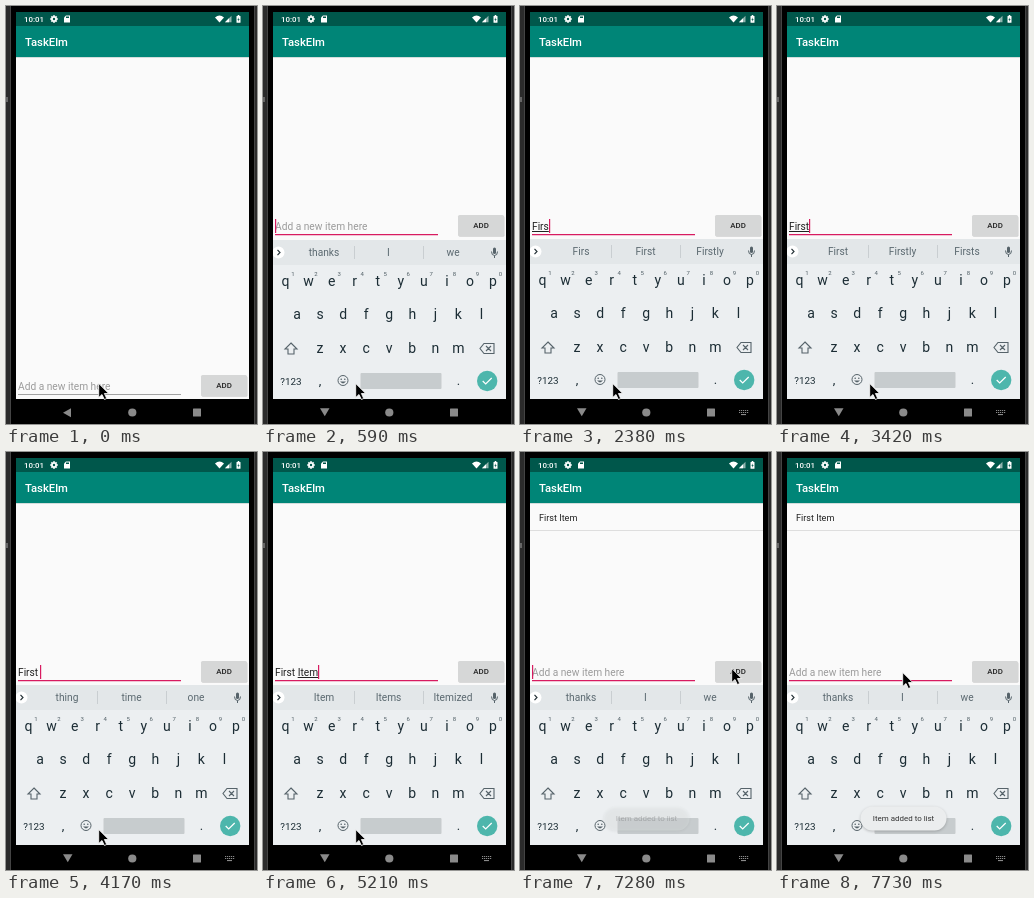
An HTML page with a canvas that plays this animation: 251 px wide and 418 px high, repeating every 8000 ms.

```html
<!DOCTYPE html>
<html lang="en">
<head>
<meta charset="utf-8">
<title>Task list app</title>
<style>
html, body { margin: 0; width: 100%; height: 100%; overflow: hidden; background: #000; }
canvas { display: block; }
</style>
</head>
<body>
<canvas id="stage" width="251" height="418"></canvas>
<script>
const c = document.getElementById('stage').getContext('2d');
const LOOP = 8000;
const ACCENT = '#d81b60', INK = '#1c2d35', ICON = '#56636a';

// time, typed text, start of the underlined word, suggestions
const TYPING = [
  [0, '', 0, 'thanks,I,we'],
  [1190, 'F', 0, 'thanks,I,we'],
  [1340, 'F', 0, 'F,For,From'],
  [1640, 'Fi', 0, 'Fi,First,Fine'],
  [2090, 'Fir', 0, 'Fi,First,Fine'],
  [2240, 'Fir', 0, 'Fir,First,Fire'],
  [2380, 'Firs', 0, 'Firs,First,Firstly'],
  [2530, 'First', 0, 'First,Firstly,Firsts'],
  [4020, 'First ', 6, 'First,Firstly,Firsts'],
  [4170, 'First ', 6, 'thing,time,one'],
  [4610, 'First I', 6, 'I,In,It'],
  [4760, 'First It', 6, 'It,Its,Item'],
  [4910, 'First Ite', 6, 'It,Its,Item'],
  [5060, 'First Ite', 6, 'Ite,Item,Items'],
  [5210, 'First Item', 6, 'Item,Items,Itemized'],
  [7130, '', 0, 'thanks,I,we']
];
const MOUSE = [[0, 93, 378], [6540, 162, 252], [6690, 199, 226], [6840, 212, 217], [7730, 126, 221]];
const CARET = [[0, 0], [290, 1], [2980, 0], [3420, 1], [5650, 0], [6250, 1], [7730, 0]];
const SLIDE = [[0, 160], [440, 70], [590, 1], [740, 0]];
const PRESS = [[0, '#d6d7d7'], [6990, '#b8b9b9'], [7130, '#c5c6c6'], [7280, '#d6d7d7']];
const TOAST = [[0, 0], [7280, .25], [7430, .6], [7580, .85], [7730, 1]];

const at = (steps, t) => steps.filter(s => s[0] <= t).pop();

function rect(x, y, w, h, fill, r = 0) {
  c.fillStyle = fill;
  c.beginPath();
  c.roundRect(x, y, w, h, r);
  c.fill();
}

function disc(x, y, r, fill) {
  c.fillStyle = fill;
  c.beginPath();
  c.arc(x, y, r, 0, 7);
  c.fill();
}

function text(s, x, y, size, fill, align = 'left', weight = 400) {
  c.font = `${weight} ${size}px Roboto, sans-serif`;
  c.textAlign = align;
  c.fillStyle = fill;
  c.fillText(s, x, y);
}

function shape(d, x, y, fill, stroke, width = 1) {
  const p = new Path2D(d);
  c.save();
  c.translate(x, y);
  if (fill) { c.fillStyle = fill; c.fill(p); }
  if (stroke) { c.strokeStyle = stroke; c.lineWidth = width; c.stroke(p); }
  c.restore();
}

function phone() {
  rect(0, 0, 251, 418, '#2b2b2b');
  rect(0, 91, 2, 5, '#666');
  rect(4, 0, 245, 418, '#000');
  rect(4, 0, 1, 418, '#444');
  rect(248, 0, 1, 418, '#444');
  rect(10, 6, 233, 387, '#fafafa');
}

function header() {
  rect(10, 51, 233, 1, '#d3dddc');
  rect(10, 20, 233, 31, '#008577');
  rect(10, 6, 233, 14, '#00574b');
  text('10:01', 18, 16, 7.9, '#fff', 'left', 500);
  for (let i = 0; i < 4; i++) {
    c.save();
    c.translate(48, 13);
    c.rotate(i * Math.PI / 4);
    rect(-.9, -3.7, 1.8, 7.4, '#fff');
    c.restore();
  }
  disc(48, 13, 2.6, '#fff');
  disc(48, 13, 1.2, '#00574b');
  shape('M2 0H6V7H0V2Z', 58, 9.5, '#fff');
  rect(60, 10.5, 3, 1.5, '#00574b');
  shape('M0 2Q4.5 -2 9 2L4.5 7Z', 209, 9.5, '#fff');
  shape('M6.5 0V6.5H0Z', 219, 9.8, '#8fb3ae');
  shape('M4 2.5V6.5H0Z', 219, 9.8, '#fff');
  rect(230.5, 10, 4, 6.8, '#fff', .5);
  rect(231.7, 9, 1.6, 1.5, '#fff');
  shape('M1.3 0L0 2.5H1L.8 4.5L2.2 1.8H1.1Z', 231.4, 11.2, '#00574b');
  text('TaskElm', 19, 40, 11.3, '#fff', 'left', 500);
}

function list() {
  text('First Item', 19, 68.5, 9.07, '#222');
  rect(10, 78, 233, 1, '#dedede');
}

function inputRow(t, typed, mark) {
  const y = t < 440 ? 160 : 0, focus = t >= 290;
  const size = 10.2, base = 224 + y;
  if (typed) text(typed, 12, base, size, '#212121');
  else text('Add a new item here', 12, base, size, '#9b9b9b');
  c.font = `400 ${size}px Roboto, sans-serif`;
  const end = 12 + c.measureText(typed).width;
  const from = 12 + c.measureText(typed.slice(0, mark)).width;
  if (end > from) rect(from, base + 1, end - from, 1, '#212121');
  rect(12, 228 + y, 163, focus ? 1.2 : .8, focus ? ACCENT : '#858585');
  if (at(CARET, t)[1]) rect(Math.round(end - .3), 213 + y, 1.2, 14, ACCENT);
  rect(195.5, 210.3 + y, 46, 20.5, '#d0d0d0', 1.5);
  rect(195, 209 + y, 46, 21, at(PRESS, t)[1], 1.5);
  text('ADD', 218, 222.2 + y, 7.9, '#222', 'center', 500);
}

function strip(words) {
  rect(10, 233, 233, 25, '#e3e7e9');
  disc(15.5, 245.5, 6, '#fff');
  shape('M0 0L2.5 2.7L0 5.4', 14.5, 242.8, null, '#263238', 1.2);
  words.split(',').forEach((w, i) => text(w, 61 + i * 64.5, 249, 10.2, '#5b6970', 'center'));
  rect(91, 239, 1, 13, '#c9ced1');
  rect(160, 239, 1, 13, '#c9ced1');
  rect(230, 240.5, 3, 6.5, ICON, 1.5);
  shape('M0 0Q0 4 3 4T6 0M3 4V6.5', 228.5, 244.5, null, ICON);
}

function keyboard(t, words) {
  const upper = t >= 1190 && t < 1340;
  c.save();
  c.beginPath();
  c.rect(10, 6, 233, 387);
  c.clip();
  c.translate(0, at(SLIDE, t)[1]);
  rect(10, 233, 233, 165, '#eceff1');
  strip(words);
  const row = (keys, x, y) => [...keys].forEach((k, i) =>
    text(upper ? k.toUpperCase() : k, x + i * 23.05, y, 14, INK, 'center'));
  row('qwertyuiop', 22.5, 278.7);
  row('asdfghjkl', 34, 312.4);
  row('zxcvbnm', 57, 346);
  [...'1234567890'].forEach((d, i) => text(d, 30 + i * 23.05, 269, 6, '#4f5d64', 'center'));

  shape('M6 0L12 6H9V11H3V6H0Z', 22, 336, upper ? ICON : null, ICON, 1.1);
  shape('M4 0H14V10H4L0 5ZM6 2.5L11 7.5M11 2.5L6 7.5', 217, 336.5, null, ICON, 1.1);

  text('?123', 28, 377.5, 9.9, INK, 'center');
  text(',', 57, 378, 13, INK, 'center');
  text('.', 195.5, 378, 13, INK, 'center');
  c.strokeStyle = ICON;
  c.lineWidth = 1;
  c.beginPath();
  c.arc(80, 373.5, 5, 0, 7);
  c.stroke();
  disc(78.2, 372.2, .8, ICON);
  disc(81.8, 372.2, .8, ICON);
  shape('M0 0Q3 3.6 6 0Z', 77, 374.6, ICON);
  rect(97.5, 366, 81, 16, '#c7ccce', 1);
  disc(224.2, 374, 10.2, '#4db6ac');
  shape('M0 3L3 6L9 0', 219.7, 371, null, '#fff', 1.2);
  c.restore();
}

function navBar(t) {
  const grey = '#8a8a8a';
  rect(10, 393, 233, 25, '#000');
  shape(t < 440 ? 'M8 0V9L0 4.5Z' : 'M0 0H9.5L4.75 8Z', 57, 402.3, grey);
  disc(126.3, 406.5, 4.1, grey);
  rect(187, 402.5, 8, 8, grey, .5);
  if (t >= 740) {
    for (let i = 0; i < 10; i++) rect(219 + i % 5 * 2, 404 + (i > 4) * 2, 1.2, 1.1, grey);
    rect(221, 408, 5, 1.1, grey);
  }
}

function toast(alpha) {
  c.save();
  c.globalAlpha = alpha;
  c.shadowColor = 'rgba(0,0,0,.22)';
  c.shadowBlur = 3;
  c.shadowOffsetY = 1;
  rect(83.5, 354.5, 86, 24, '#ebedee', 12);
  c.shadowColor = 'transparent';
  text('Item added to list', 126.5, 369, 7.95, '#333', 'center');
  c.restore();
}

function draw(t) {
  const [, typed, mark, words] = at(TYPING, t);
  const [, mx, my] = at(MOUSE, t);
  const alpha = at(TOAST, t)[1];
  phone();
  header();
  if (t >= 7130) list();
  inputRow(t, typed, mark);
  if (t >= 440) keyboard(t, words);
  navBar(t);
  if (alpha) toast(alpha);
  shape('M0 0V14L3.3 11L5.7 16L8 15L5.7 10H10Z', mx - .3, my - .5, '#000', '#fff', .8);
}

const start = performance.now();
function tick() {
  draw((performance.now() - start) % LOOP);
  requestAnimationFrame(tick);
}
tick();
</script>
</body>
</html>
```
